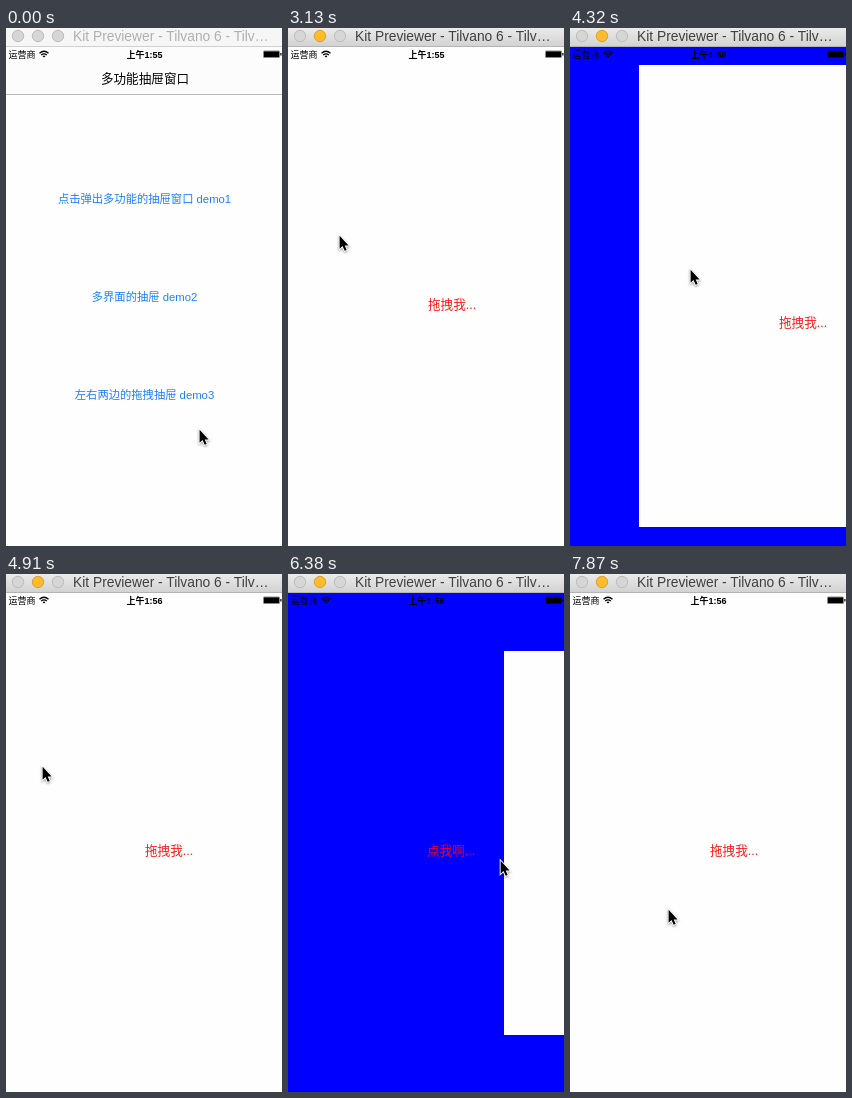
Recreate the animation shown at these times as an HTML page. Size 276x518 px, loop 8 s.

```html
<!DOCTYPE html>
<html lang="zh">
<head>
<meta charset="utf-8">
<title>Drawer demo</title>
<style>
  html, body { margin: 0; width: 100%; height: 100%; overflow: hidden; background: #fff; }
  svg { display: block; font-family: "Liberation Sans", "Noto Sans CJK SC", "Noto Sans CJK", sans-serif; }
  .link { font-size: 11.3px; fill: #1a82fb; text-anchor: middle; }
  .drag { font-size: 12.6px; fill: #ff1a14; }
  #left .drag { fill: #e6002a; }
  #bar text { font-size: 13.8px; }
  #cursor { filter: drop-shadow(0 1px 1px rgba(0, 0, 0, .4)); }
</style>
</head>
<body>
<svg width="276" height="518" viewBox="0 0 276 518">
  <defs>
    <linearGradient id="chrome" x2="0" y2="1">
      <stop stop-color="#ebebeb"/><stop offset="1" stop-color="#d2d2d2"/>
    </linearGradient>
  </defs>
  <rect width="276" height="518" fill="#fefefe"/>

  <g id="home">
    <g id="nav">
      <rect y="19" width="276" height="47" fill="#fcfcfc"/>
      <rect y="66" width="276" height="1" fill="#b9b9b9"/>
      <text x="139" y="55" font-size="12.6" font-weight="500" text-anchor="middle">多功能抽屉窗口</text>
    </g>
    <text class="link" x="138.5" y="175">点击弹出多功能的抽屉窗口 demo1</text>
    <text class="link" x="138.5" y="273">多界面的抽屉 demo2</text>
    <text class="link" x="138.5" y="370.5" id="pick">左右两边的拖拽抽屉 demo3</text>
  </g>

  <g id="left">
    <rect y="19" width="276" height="499" fill="#00f"/>
    <text class="drag" x="139" y="281">点我啊...</text>
  </g>

  <g id="page">
    <rect id="sheet" width="280" fill="#fefefe"/>
    <rect id="edge" x="-1" width="1" height="499" fill="#ddd"/>
    <text class="drag" x="140" y="262">拖拽我...</text>
  </g>

  <g id="status">
    <text x="2.5" y="29.5" font-size="9">运营商</text>
    <g fill="none" stroke="#000" stroke-width="1.3">
      <path d="M33.5 25.2Q38 21.2 42.5 25.2M35.2 27Q38 24.6 40.8 27"/>
      <path d="M38 29.5L36.6 28.2Q38 27 39.4 28.2Z" fill="#000" stroke="none"/>
    </g>
    <text id="clock" x="138.5" y="29.5" font-size="9" font-weight="bold" text-anchor="middle"></text>
    <rect x="257" y="22.5" width="17" height="7.5" rx="1.5" fill-opacity=".45"/>
    <rect x="258" y="23.5" width="15" height="5.5"/>
    <rect x="274.3" y="25" width="1.2" height="2.5"/>
  </g>

  <g id="bar">
    <rect id="barBack" width="276" height="18"/>
    <rect id="barLine" y="18" width="276" height="1"/>
    <g stroke="#bdbdbd" fill="#d6d6d6">
      <circle cx="12" cy="8" r="5.7"/>
      <circle id="amber" cx="32" cy="8" r="5.7"/>
      <circle cx="52" cy="8" r="5.7"/>
    </g>
    <text id="title" x="67" y="13">Kit Previewer - Tilvano 6 - Tilv…</text>
  </g>

  <g id="cursor">
    <path d="M.6 .8V13.8L3.5 11.1L5.7 15.8L7.7 14.9L5.7 10.5H9.6Z" stroke="#fff" stroke-width="1.8" paint-order="stroke"/>
  </g>
</svg>

<script>
const LOOP = 8000, TICK = 148.4, WIDTH = 276, OPEN = 216;

// Moments of the story, in ticks
const PRESS = 12, PUSHED = 15, MINUTE = 29, REGRAB = 34, RELEASE = 43, CLOSE = 51;

const START = [193, 401];
const MOVES = [
  { from: 1, to: 6, end: [148, 364] },
  { from: 16, to: 20, end: [51, 207] },
  { from: 21, to: 28, end: [167, 269] },
  { from: 28, to: 33, end: [36, 192] },
  { from: REGRAB, to: RELEASE, end: [212, 286] },
  { from: RELEASE, to: 49, end: [98, 335] }
];

const el = id => document.getElementById(id);
const set = (id, attrs) => {
  for (const name in attrs) el(id).setAttribute(name, attrs[name]);
};
const show = (id, on) => set(id, { visibility: on ? "visible" : "hidden" });
const move = (id, x, y) => set(id, { transform: `translate(${x} ${y})` });
const clamp = (v, lo, hi) => Math.min(hi, Math.max(lo, v));

// Eased progress from tick a to tick b
const ease = (k, a, b) => 1 - (1 - clamp((k - a) / (b - a), 0, 1)) ** 2;

function pointer(k) {
  return MOVES.reduce((pos, { from, to, end }) =>
    pos.map((v, i) => v + (end[i] - v) * ease(k, from, to)), START);
}

// The page slides in, follows the pointer, snaps open, then closes
function pageX(k, pointerX) {
  if (k < PUSHED) return (WIDTH - 1) * (1 - ease(k, PRESS, PUSHED));
  if (k < 21) return 0;
  if (k < RELEASE) return clamp(pointerX - (k < REGRAB ? 51 : 36), -1, OPEN);
  return OPEN * (1 - ease(k, CLOSE, CLOSE + 2));
}

function draw() {
  const k = Math.floor(performance.now() % LOOP / TICK + 0.02);
  const active = k >= PRESS, pushed = k >= PUSHED;
  const [px, py] = pointer(k).map(Math.round);
  const x = Math.round(pageX(k, px));
  const inset = pushed ? Math.abs(x) * 0.267 : 0;

  show("home", !pushed);
  show("nav", !active);
  show("left", pushed && x > 0);
  show("page", active);
  show("edge", active && !pushed);
  move("home", active ? (x - WIDTH + 1) * 0.3 : 0, 0);
  set("pick", { opacity: active ? 0.2 : 1 });
  move("page", x, Math.round(19 + inset));
  set("sheet", { height: Math.round(499 - 2 * inset) });

  el("clock").textContent = k < MINUTE ? "上午1:55" : "上午1:56";
  set("barBack", { fill: active ? "url(#chrome)" : "#f6f6f6" });
  set("barLine", { fill: active ? "#b4b4b4" : "#d0d0d0" });
  set("amber", active ? { fill: "#fdbc2e", stroke: "#e0a028" } : { fill: "#d6d6d6", stroke: "#bdbdbd" });
  set("title", { fill: active ? "#404040" : "#b0b0b0" });
  move("cursor", px, py);
  requestAnimationFrame(draw);
}
draw();
</script>
</body>
</html>
```
